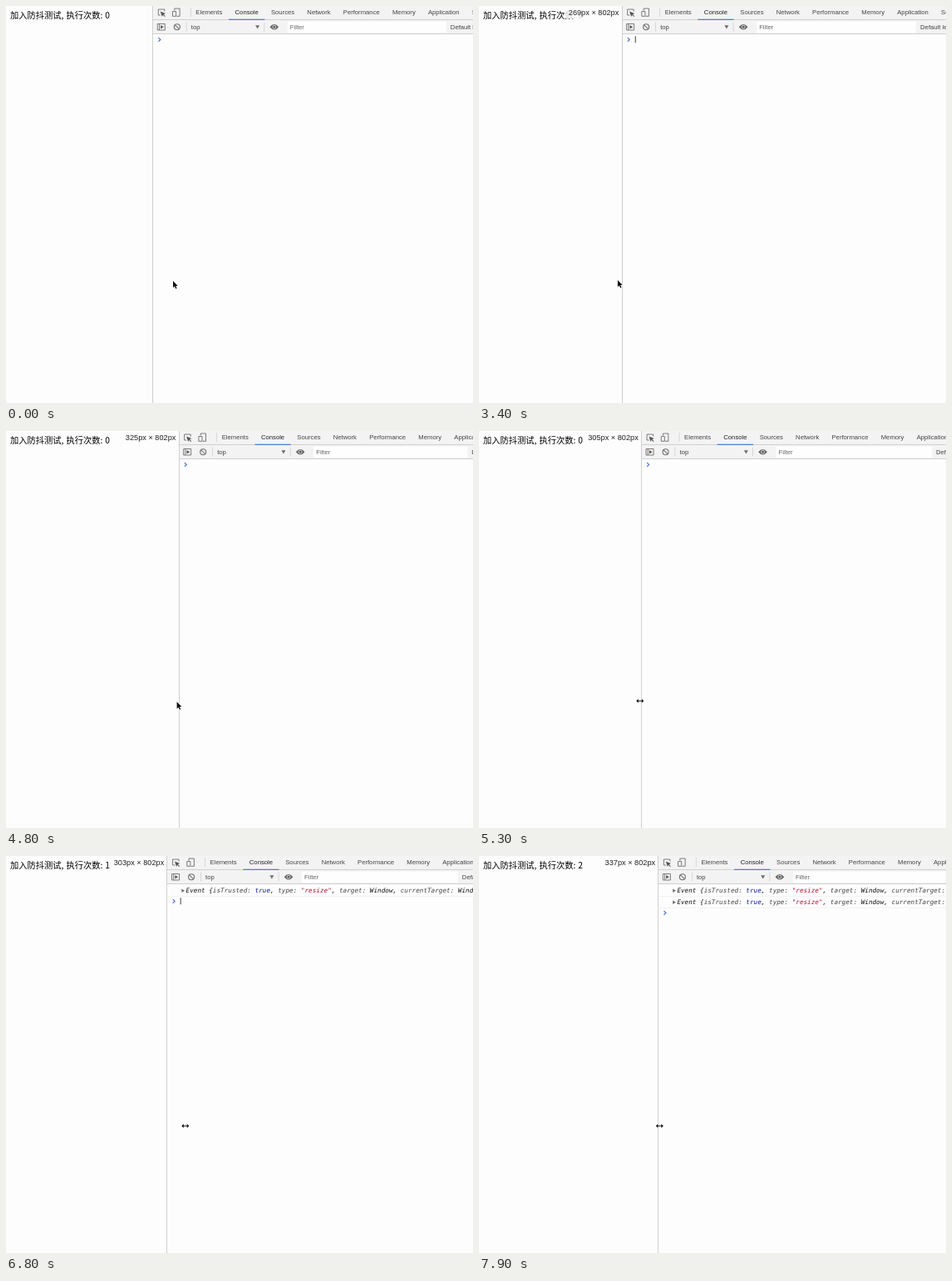
These frames come from a looping animation (562x478 px, 8000 ms). An HTML page with a canvas:

```html
<!DOCTYPE html>
<html lang="zh">
<head>
<meta charset="utf-8">
<title>Debounced resize</title>
<style>
html, body { margin: 0; width: 100%; height: 100%; overflow: hidden; background: #fdfdfd; }
canvas { display: block; }
</style>
</head>
<body>
<canvas id="stage" width="562" height="478"></canvas>
<script>
const W = 562, H = 478, LOOP = 8000, STEP = 100;
const SCALE = 0.6406;  // stage pixels per page pixel
const LEAD = 180;      // how far the pointer runs ahead of the layout, in ms
const GRAB = 2400;     // when the pointer settles on the divider
const ctx = document.getElementById('stage').getContext('2d');

const SANS = '"Liberation Sans", Arial, sans-serif';
const UI = `7.69px ${SANS}`;
const BADGE = `9.2px ${SANS}`;
const PAGE = '10.25px "Noto Sans CJK SC", "Noto Sans CJK", sans-serif';
const MONO = 'italic 7.66px "DejaVu Sans Mono", monospace';
const CHAR = 4.61;

const TABS = 'Elements Console Sources Network Performance Memory Application Security'.split(' ');
const TAB_GAP = 15.2;
const LOG = 'Event {isTrusted: true, type: "resize", target: Window, currentTarget: Window,';
const ICON = '#6e6e6e', BORDER = '#d0d0d0';

// Sum of eased moves, each [start, end, distance].
function travel(t, from, ...moves) {
  return moves.reduce((pos, [start, end, distance]) => {
    const k = Math.min(1, Math.max(0, (t - start) / (end - start)));
    return pos + distance * k * k * (3 - 2 * k);
  }, from);
}

const pageWidth = t => travel(t, 276, [3150, 4000, -35], [4050, 4500, 87],
  [4600, 5600, -29], [6400, 6700, 1], [6750, 7050, 40], [7050, 7300, -3]);

const pointerX = t => pageWidth(t + LEAD) * SCALE + 1.5 +
  travel(t, 22.7, [200, 1150, -24], [1400, 2000, 3.5], [2100, 2800, -2.2]);

const pointerY = t => travel(t, 331, [1200, 2000, -2.5], [2100, 2400, 1.5], [4100, 5100, -5]);

const within = (t, a, b) => t >= a && t < b;

function text(str, x, y, font, color, align = 'left') {
  ctx.font = font;
  ctx.fillStyle = color;
  ctx.textAlign = align;
  ctx.fillText(str, x, y);
}

function rect(x, y, w, h, color) {
  ctx.fillStyle = color;
  ctx.fillRect(x, y, w, h);
}

function fill(d, color) {
  ctx.fillStyle = color;
  ctx.fill(new Path2D(d));
}

function stroke(d, color, width = 1) {
  ctx.strokeStyle = color;
  ctx.lineWidth = width;
  ctx.stroke(new Path2D(d));
}

function ring(x, y, r, color, width) {
  ctx.beginPath();
  ctx.arc(x, y, r, 0, Math.PI * 2);
  ctx.strokeStyle = color;
  ctx.lineWidth = width;
  ctx.stroke();
}

function at(x, y, draw) {
  ctx.save();
  ctx.translate(x, y);
  draw();
  ctx.restore();
}

function icons() {
  // inspect
  stroke('M9 11H6.5V4H14V6.5', ICON, 0.9);
  fill('M9 6.5L15.2 9L12.8 9.9L15 12.2L14.2 13L12 10.7L11 13Z', '#555');
  // device
  stroke('M26 5.5V3H32.3V12.3H28.5M23.7 6.5H27.8V12.3H23.7Z', ICON, 0.9);
  // sidebar
  stroke('M5.5 21.5H14.5V29H5.5ZM7.7 21.5V29', ICON, 0.9);
  fill('M9.3 22.9L13 25.2L9.3 27.6Z', '#555');
  // clear
  ring(29, 25.2, 3.5, ICON, 1.1);
  stroke('M26.6 22.8L31.4 27.6', ICON, 1.1);
  // eye
  fill('M140.7 25.2Q146 18.6 151.3 25.2Q146 31.8 140.7 25.2', '#606060');
  ring(146, 25.2, 2, '#f3f3f3', 0.8);
}

function tabBar() {
  let x = 51.5;
  for (const name of TABS) {
    const active = name === 'Console';
    text(name, x, 10.3, UI, active ? '#222' : '#444');
    const w = ctx.measureText(name).width + TAB_GAP;
    if (active) rect(x - TAB_GAP / 2, 15.7, w, 1.3, '#4d83d6');
    x += w;
  }
}

function toolbar(edge) {
  rect(0, 0, W, 33, '#f3f3f3');
  rect(0, 16, W, 1, BORDER);
  rect(0, 33, W, 1, BORDER);
  tabBar();
  icons();
  rect(45, 2, 0.8, 11, BORDER);
  rect(40, 19.5, 0.8, 11, BORDER);
  rect(133.6, 19.5, 0.8, 11, BORDER);

  text('top', 46, 27.8, UI, '#444');
  fill('M123.3 23.3H128.3L125.8 27.6Z', ICON);

  // The filter field takes part of the panel's change in width.
  const end = 353 - 0.19 * (edge - 177);
  rect(162, 18.8, end - 162, 13.2, '#fefefe');
  text('Filter', 165, 28.1, UI, '#666');
  text('Default levels', end + 5, 27.8, UI, '#444');
}

function tokenColor(token) {
  if (token.endsWith(':')) return '#444';
  if (token === 'true') return '#0d1a9a';
  return token.startsWith('"') ? '#b5122e' : '#111';
}

function logRow(y) {
  fill(`M17.3 ${y - 2.3}L21 ${y}L17.3 ${y + 2.3}Z`, ICON);
  for (const { 0: token, index } of LOG.matchAll(/"\w+"|\w+:?|[{,]/g)) {
    text(token, 22.5 + index * CHAR, y + 2.7, MONO, tokenColor(token));
  }
  rect(0, y + 6.5, W, 0.8, '#f0f0f0');
}

function consoleBody(count, caret) {
  for (let i = 0; i < count; i++) logRow(41.7 + i * 14);
  const y = 40.5 + count * 14;
  stroke(`M6.6 ${y - 2.3}L9.1 ${y}L6.6 ${y + 2.3}`, '#4a6cc8', 1.1);
  if (caret) rect(15.6, y - 4.2, 1, 8, '#444');
}

function page(count, width, edge, resizing) {
  text('加入防抖测试,', 5, 15.3, PAGE, '#000');
  text('执行次数:', 72.4, 15.3, PAGE, '#000');
  text(count, 119.2, 15.3, PAGE, '#000');
  if (!resizing) return;
  rect(edge - 68.5, 0, 68.5, 15, 'rgba(253,253,253,0.85)');
  text(`${Math.round(width)}px × 802px`, edge - 3.8, 11, BADGE, '#222', 'right');
}

function arrowCursor() {
  const outline = 'M0 0V8.3L1.9 6.6L3.2 9.5L4.6 8.9L3.3 6L5.8 5.9Z';
  stroke(outline, '#fff', 1.2);
  fill(outline, '#111');
}

function resizeCursor() {
  const body = 'M-4.5 0L-2 -2.5V-.6H2V-2.5L4.5 0L2 2.5V.6H-2V2.5Z';
  stroke(body, '#fff', 1);
  fill(body, '#111');
}

function render(t) {
  const width = pageWidth(t), edge = width * SCALE;
  const x = pointerX(t);
  const count = (t >= 6000) + (t >= 7500);
  const caret = within(t, 3000, 3500) || within(t, 6500, 7000);
  const overPage = x < edge - 2;

  rect(0, 0, W, H, '#fdfdfd');
  page(count, width, edge, t >= 3200);
  at(edge, 0, () => {
    toolbar(edge);
    consoleBody(count, caret);
  });
  rect(Math.floor(edge - 0.1), 0, 1, H, BORDER);
  at(x, pointerY(t), t < GRAB || overPage ? arrowCursor : resizeCursor);
}

const start = performance.now();
function tick() {
  const t = (performance.now() - start) % LOOP;
  render(Math.floor(t / STEP) * STEP);
  requestAnimationFrame(tick);
}
tick();
</script>
</body>
</html>
```
